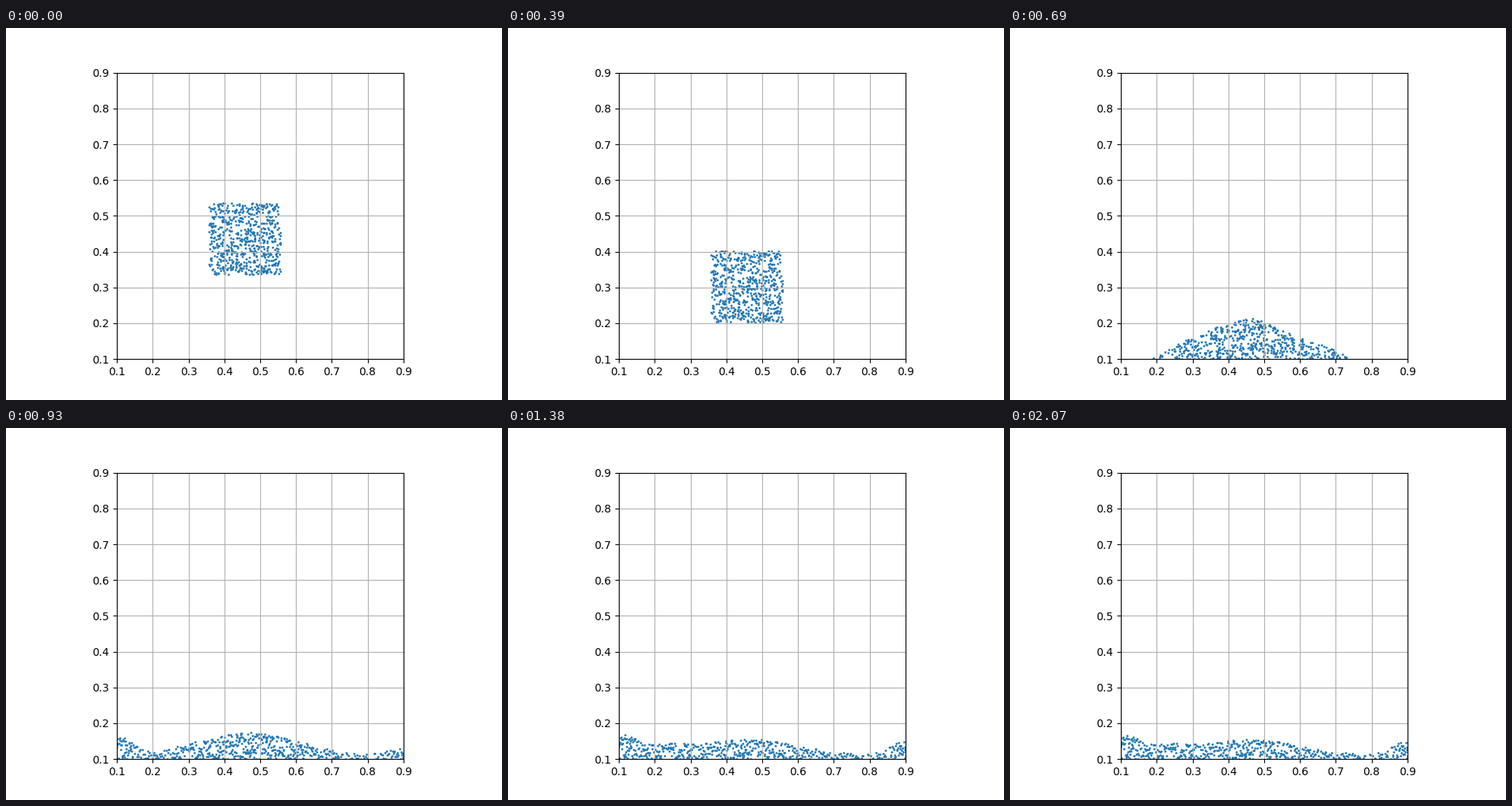
Write a matplotlib script that moves like this. It is 640x480 px and loops after 2100 ms.

```python
import numpy as np
import matplotlib.pyplot as plt
from matplotlib.animation import FuncAnimation

FRAMES, INTERVAL = 70, 30
COUNT, SIDE = 640, 0.2
LEFT, BOTTOM = 0.357, 0.336
FLOOR, WALL = 0.094, 0.906
DROP = 0.00079         # fall per frame squared
IMPACT = 17            # last frame of free fall
PEAK = 0.12            # heap height right after the impact

rng = np.random.default_rng(7)
u, v = rng.random((2, COUNT))


def cdf(weights):
    """Normalised running integral by the trapezoid rule."""
    total = np.concatenate([[0], np.cumsum((weights[1:] + weights[:-1]) / 2)])
    return total / total[-1]


def flanks(t):
    """Left and right edge of the heap at relative height t."""
    return 0.465 - 0.295 * (1 - t)**0.7, 0.475 + 0.3 * (1 - t)


def heap_top(x):
    """Relative height of the heap surface, the inverse of flanks."""
    west = np.clip((0.465 - x) / 0.295, 0, 1)**(1 / 0.7)
    east = np.clip((x - 0.475) / 0.3, 0, 1)
    return 1 - np.maximum(west, east)


def flatten():
    """Turn the square row by row into a heap; bottom rows spread widest."""
    ts = np.linspace(0, 1, 400)
    west, east = flanks(ts)
    t = np.interp(v, cdf(east - west), ts)
    west, east = flanks(t)
    x = west + u * (east - west)
    depth = np.clip(t / np.maximum(heap_top(x), 1e-6), 0, 1)
    return np.array([x, FLOOR + PEAK * t]), depth


def layer(base, *bumps, scale=1.0):
    """Spread the heap column by column under a sum of bell curves."""
    xs = np.linspace(FLOOR, WALL, 800)
    hs = base + sum(h * np.exp(-((xs - c) / s)**2 / 2) for c, h, s in bumps)
    x = np.interp(column, cdf(hs), xs)
    return np.array([x, FLOOR + scale * depth * np.interp(x, xs, hs)])


block = np.array([LEFT + SIDE * u, BOTTOM + SIDE * v - DROP * IMPACT**2])
heap, depth = flatten()
column = (np.argsort(np.argsort(heap[0])) + 0.5) / COUNT

# Bumps are (centre, height, spread).
wave = layer(0.014, (0.47, 0.066, 0.15), (0.1, 0.055, 0.04), (0.9, 0.024, 0.04))
dune = 0.022, (0.47, 0.04, 0.12), (0.1, 0.05, 0.05), (0.24, 0.021, 0.07), (0.9, 0.037, 0.035)
rest, settled = layer(*dune), layer(*dune, scale=0.99)

times = [IMPACT, 23, 31, 43, FRAMES - 1]
poses = np.array([block, heap, wave, rest, settled])
slopes = np.diff(poses, axis=0) / np.diff(times)[:, None, None]
speeds = np.zeros_like(poses)
speeds[1:-1] = (slopes[1:] + slopes[:-1]) / 2
speeds[0] = [slopes[0, 0], -2 * DROP * IMPACT * v]
speeds[-2] = slopes[-1]


def positions(n):
    """Free fall, then cubic Hermite motion from pose to pose."""
    if n <= IMPACT:
        return block + np.array([[0], [DROP * (IMPACT**2 - n**2)]])
    k = np.searchsorted(times, n) - 1
    span = times[k + 1] - times[k]
    t = (n - times[k]) / span
    blend = t * t * (3 - 2 * t)
    pos = (poses[k] * (1 - blend) + poses[k + 1] * blend
           + span * t * (1 - t) * ((1 - t) * speeds[k] - t * speeds[k + 1]))
    return np.clip(pos, FLOOR, WALL)


fig, ax = plt.subplots(figsize=(6.4, 4.8), dpi=100)
ticks = np.arange(1, 10) / 10
ax.set(aspect="equal", xlim=(0.1, 0.9), ylim=(0.1, 0.9),
       xticks=ticks, yticks=ticks)
ax.grid(True)
dots = ax.scatter(*positions(0), s=1)


def update(n):
    dots.set_offsets(positions(n).T)
    return (dots,)


anim = FuncAnimation(fig, update, frames=FRAMES, interval=INTERVAL,
                     repeat=True, repeat_delay=0)
plt.show()
```
